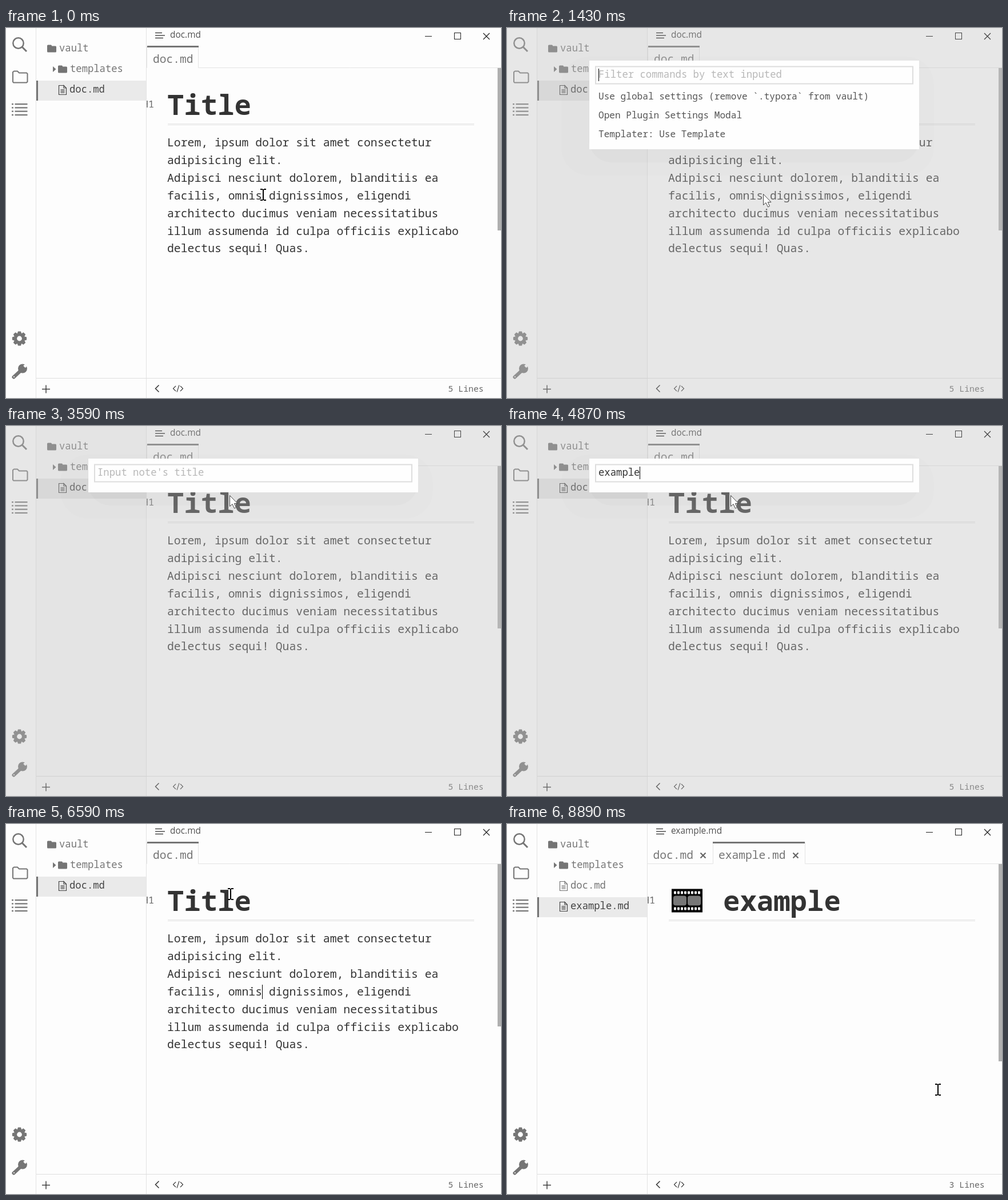
Write an HTML page with a canvas that moves like this. It is 866x647 px and loops after 8960 ms.

```html
<!DOCTYPE html>
<html lang="en">
<head>
<meta charset="utf-8">
<title>Template picker</title>
<style>
html, body { margin: 0; width: 100%; height: 100%; overflow: hidden; background: #fdfdfd; }
canvas { display: block; }
</style>
</head>
<body>
<canvas id="stage" width="866" height="647"></canvas>
<script>
const ctx = document.getElementById('stage').getContext('2d');
const LOOP = 8960, TICK = 200 / 3;
const MONO = '"Noto Sans Mono", monospace', SANS = '"Open Sans", sans-serif';
const BG = '#fdfdfd', ICON = '#757575', LINE = '#e4e4e4', INK = '#333';

const PARAGRAPH = [
  'Lorem, ipsum dolor sit amet consectetur',
  'adipisicing elit.',
  'Adipisci nesciunt dolorem, blanditiis ea',
  'facilis, omnis dignissimos, eligendi',
  'architecto ducimus veniam necessitatibus',
  'illum assumenda id culpa officiis explicabo',
  'delectus sequi! Quas.'
];
const COMMANDS = [
  'Use global settings (remove `.typora` from vault)',
  'Open Plugin Settings Modal',
  'Templater: Use Template'
];
// Times at which each letter of the note title is typed
const KEYS = [3860, 4060, 4190, 4320, 4470, 4740, 4870];
// Pointer path: time, x, y of the arrow tip
const PATH = [
  [0, 448, 290], [1560, 448, 290], [1900, 444, 222], [2130, 436, 186],
  [2270, 434, 184], [2467, 419, 141], [2600, 391, 121],
  [7050, 391, 121], [7270, 290, 88], [7470, 205, 72], [7700, 152, 104],
  [7930, 133, 143], [8000, 135, 145], [8590, 135, 145],
  [8730, 400, 295], [8866, 752, 463]
];

function rect(x, y, w, h, color) {
  ctx.fillStyle = color;
  ctx.fillRect(x, y, w, h);
}

function text(str, x, y, size, color, weight = 400, family = MONO) {
  ctx.font = `${weight} ${size}px ${family}`;
  ctx.fillStyle = color;
  ctx.fillText(str, x, y);
}

function trace(points) {
  ctx.beginPath();
  points.forEach(([x, y], i) => i ? ctx.lineTo(x, y) : ctx.moveTo(x, y));
}

function line(points, color, width = 1, cap = 'butt') {
  trace(points);
  ctx.strokeStyle = color;
  ctx.lineWidth = width;
  ctx.lineCap = cap;
  ctx.lineJoin = cap === 'round' ? 'round' : 'miter';
  ctx.stroke();
}

function shape(points, color) {
  trace(points);
  ctx.fillStyle = color;
  ctx.fill();
}

function disc(x, y, r, color) {
  ctx.beginPath();
  ctx.arc(x, y, r, 0, Math.PI * 2);
  ctx.fillStyle = color;
  ctx.fill();
}

function roundRect(x, y, w, h, r, color) {
  ctx.beginPath();
  ctx.roundRect(x, y, w, h, r);
  ctx.fillStyle = color;
  ctx.fill();
}

function cross(x, y, r, color, width) {
  line([[x - r, y - r], [x + r, y + r]], color, width);
  line([[x + r, y - r], [x - r, y + r]], color, width);
}

function pointerAt(t) {
  const s = Math.floor((t + 8) / TICK) * TICK;
  let i = 0;
  while (i < PATH.length - 1 && PATH[i + 1][0] <= s) i++;
  const a = PATH[i], b = PATH[i + 1] || a;
  const k = b === a ? 0 : (s - a[0]) / (b[0] - a[0]);
  return { x: Math.round(a[1] + (b[1] - a[1]) * k), y: Math.round(a[2] + (b[2] - a[2]) * k) };
}

function activityBar() {
  ctx.beginPath();
  ctx.arc(21.5, 26.5, 9.2, 0, Math.PI * 2);
  ctx.strokeStyle = ICON;
  ctx.lineWidth = 2.5;
  ctx.stroke();
  line([[28, 33], [36, 41]], ICON, 3);
  line([[14, 75.5], [20, 75.5], [23, 78.5], [36, 78.5], [37.5, 80], [37.5, 94],
    [36, 95.5], [13, 95.5], [12, 94], [12, 77], [14, 75.5]], ICON, 2, 'round');
  for (let i = 0; i < 4; i++) {
    const y = 133 + i * 6.3;
    rect(10, y - 1, 3, 2.2, ICON);
    rect(15.5, y - 1, 22, 2.2, ICON);
  }
  disc(23.5, 543, 9.8, ICON);
  for (let i = 0; i < 8; i++) {
    ctx.save();
    ctx.translate(23.5, 543);
    ctx.rotate(i * Math.PI / 4);
    shape([[-3.6, -9], [-2.5, -12.6], [2.5, -12.6], [3.6, -9]], ICON);
    ctx.restore();
  }
  disc(23.5, 543, 4.4, BG);
  line([[13.5, 610.5], [27, 598]], ICON, 6, 'round');
  disc(29, 595.5, 8, ICON);
  line([[32, 592.5], [39, 585.5]], BG, 5);
  disc(14, 610, 1.1, BG);
}

function folderIcon(x, y) {
  roundRect(x, y, 8, 6, 1.5, ICON);
  roundRect(x, y + 2, 16, 11, 1.5, ICON);
}

function fileIcon(x, y, color) {
  line([[x + 8.5, y], [x, y], [x, y + 16], [x + 13, y + 16], [x + 13, y + 4.5],
    [x + 8.5, y], [x + 8.5, y + 4.5], [x + 13, y + 4.5]], color, 1.2);
  [7.5, 10, 12.5].forEach(d => line([[x + 3, y + d], [x + 10, y + d]], color, 1.2));
}

function sidebar(t, pointer) {
  const inside = t > 7110 && pointer.x < 245;
  const selected = t >= 8150 ? 1 : 0;
  rect(53, 92 + selected * 36, 192, 35, '#eaeaea');
  rect(53, 92 + selected * 36, 3, 35, ICON);
  folderIcon(72, 29.5);
  text('vault', 93, 41, 17.2, ICON);
  const hoverFolder = inside && pointer.y > 55 && pointer.y < 91;
  shape([[82, 67], [87.5, 72], [82, 77]], ICON);
  folderIcon(91, 65.5);
  text('templates', 112, 77, 17.2, hoverFolder ? '#444' : ICON);
  ['doc.md', 'example.md'].forEach((name, i) => {
    if (i && t < 6780) return;
    const hover = inside && Math.abs(pointer.y - 109 - i * 36) < 18;
    const color = i === selected || hover ? '#444' : ICON;
    fileIcon(92.5, 100.5 + i * 36, color);
    text(name, 111, 113 + i * 36.4, 17.2, color);
  });
  if (inside) {
    text('vault', 115, 637, 15, ICON);
    [626, 631, 636].forEach(y => disc(199, y, 1.3, ICON));
    [626, 631, 636].forEach(y => rect(221, y - 1, 12, 1.5, ICON));
  }
}

function tabs(opened) {
  const [left, right] = opened ? [360, 521] : [246, 336];
  line([[246, 69.5], [left + .5, 69.5], [left + .5, 32]], LINE);
  line([[right + .5, 32], [right + .5, 69.5], [866, 69.5]], LINE);
  rect(left + (opened ? 0 : 1), 31, right - left, 3, ICON);
  text('doc.md', opened ? 255.5 : 257, 61, 19.6, ICON);
  if (opened) {
    text('example.md', 370, 61, 19.6, ICON);
    cross(343, 55, 4.5, '#666', 2.2);
    cross(505, 55, 4.5, '#666', 2.2);
  }
}

function film(x, y) {
  rect(x, y, 54, 41, '#000');
  for (let i = 0; i < 8; i++) {
    const hx = x + 4 + i * 6;
    roundRect(hx, y + 4, 4, 5, 1, '#fff');
    roundRect(hx, y + 32, 4, 5, 1, '#fff');
  }
  roundRect(x + 3, y + 12, 23, 17, 4, '#777');
  roundRect(x + 28, y + 12, 23, 17, 4, '#777');
}

function editorCaret(t) {
  if (t < 1430) return (t >= 130 && t < 590) || t >= 1150;
  return t >= 6590 && t < 8220 && Math.floor((t - 6590) / 530) % 2 === 0;
}

function editor(t, opened) {
  ctx.save();
  ctx.beginPath();
  ctx.rect(246, 70, 614, 542);
  ctx.clip();
  text('H1', 238.8, 138.5, 17, '#666');
  rect(283, 167, 536, 1, LINE);
  rect(283, 169, 536, 1, LINE);
  if (opened) {
    film(288, 113.5);
    text('example', 378, 152, 49, INK, 700);
  } else {
    text('Title', 282, 151.5, 49, INK, 700);
    PARAGRAPH.forEach((row, i) => text(row, 282, 207 + i * 30.9, 19.77, INK));
    if (editorCaret(t)) rect(448, 281, 1, 25, '#000');
  }
  ctx.restore();
  rect(860, 70, 6, opened ? 345 : 284, '#b0b0b0');
}

function footer(opened) {
  const ink = '#333';
  rect(53, 612, 813, 1, '#dedede');
  line([[63, 631.5], [77, 631.5]], ink, 1.4);
  line([[70, 624.5], [70, 638.5]], ink, 1.4);
  line([[267.5, 624.5], [261.5, 630.5], [267.5, 636.5]], ink, 1.5);
  line([[297, 626], [292.5, 630.5], [297, 635]], ink, 1.1);
  line([[305, 626], [309.5, 630.5], [305, 635]], ink, 1.1);
  line([[303, 624.5], [299, 636.5]], ink, 1.1);
  text(opened ? '3 Lines' : '5 Lines', 773.5, 636, 14.8, '#666');
}

function titleBar(opened, dim) {
  const ink = dim ? '#444' : '#222';
  line([[261, 8.5], [273, 8.5]], ink, 1.2);
  line([[261, 13], [278, 13]], ink, 1.2);
  line([[261, 17.5], [275, 17.5]], ink, 1.2);
  text(opened ? 'example.md' : 'doc.md', 287, 17, 15.4, dim ? '#707070' : '#505050', 400, SANS);
  line([[733, 14.5], [745, 14.5]], ink);
  ctx.lineWidth = 1;
  ctx.strokeStyle = ink;
  ctx.strokeRect(784.5, 8.5, 11, 11);
  cross(840.5, 14.5, 5.5, ink, 1.2);
}

function modalAt(t) {
  const blink = start => Math.floor((t - start) / 530) % 2 === 0;
  if (t < 2270) {
    return { hint: 'Filter commands by text inputed', items: COMMANDS, caret: blink(1430) };
  }
  if (t < 3070) {
    return { hint: 'Select a template', items: ['tmpl.md'], caret: blink(2270), active: t >= 2800 ? 0 : -1 };
  }
  if (t < 5200) {
    const typed = 'example'.slice(0, KEYS.filter(k => k <= t).length);
    return { hint: "Input note's title", typed, items: [], caret: typed || t < 3590 };
  }
  return {
    hint: "Pick note's type", items: ['book', 'video', 'music'], active: t >= 5860 ? 1 : -1,
    caret: t < 5730 || (t >= 5860 && t < 6190)
  };
}

function modal(t, pointer) {
  const { hint, typed = '', items, caret, active = -1 } = modalAt(t);
  const height = items.length ? 57 + items.length * 33 - 1 : 59;
  // The shadow is so faint that it shows as two flat bands
  roundRect(95, 50, 652, height + 53, 48, 'rgba(0,0,0,.008)');
  roundRect(143, 57, 578, height + 23, [0, 0, 40, 40], 'rgba(0,0,0,.02)');
  rect(144, 57, 577, height, '#fefefe');
  ctx.strokeStyle = '#ddd';
  ctx.lineWidth = 2;
  ctx.strokeRect(155, 67.5, 555, 30);
  text(typed || hint, 160, 87, 17.25, typed ? INK : '#b8b8b8');
  if (caret) rect(160 + Math.round(typed.length * 10.35), 71, 1, 22, '#000');
  items.forEach((item, i) => {
    const top = 103 + i * 33;
    const hover = pointer.y >= top && pointer.y < top + 33;
    if (hover || i === active) rect(148, top, 569, 33, '#f7f7f7');
    text(item, 160, 125 + i * 33, 16.1, '#555');
  });
}

function arrow({ x, y }) {
  const outline = [[0, 0], [0, 19], [4.5, 15], [8, 22.5], [11, 21], [7.8, 14], [13.5, 14], [0, 0]]
    .map(([dx, dy]) => [x + dx + .5, y + dy + .5]);
  shape(outline, '#fff');
  line(outline, '#444');
}

function textCursor({ x, y }) {
  const cx = x + 2, top = y - 9, bottom = y + 12;
  rect(cx - 1, top + 1, 2, bottom - top - 2, '#000');
  for (const edge of [top, bottom - 2]) {
    rect(cx - 5, edge, 4, 2, '#000');
    rect(cx + 1, edge, 4, 2, '#000');
  }
}

function draw(t) {
  const pointer = pointerAt(t);
  const opened = t >= 8220;
  const dim = t >= 1430 && t < 6590;
  rect(0, 0, 866, 647, BG);
  activityBar();
  sidebar(t, pointer);
  tabs(opened);
  editor(t, opened);
  rect(52, 0, 1, 647, LINE);
  rect(245, 0, 1, 647, LINE);
  footer(opened);
  if (dim) {
    rect(0, 0, 866, 647, 'rgba(193,193,193,.367)');
    rect(53, 0, 192, 647, 'rgba(0,0,0,.012)');
  }
  titleBar(opened, dim);
  if (dim) modal(t, pointer);
  if (dim || pointer.x < 245) arrow(pointer);
  else textCursor(pointer);
}

const start = performance.now();
function frame() {
  draw((performance.now() - start) % LOOP);
  requestAnimationFrame(frame);
}
frame();
</script>
</body>
</html>
```
